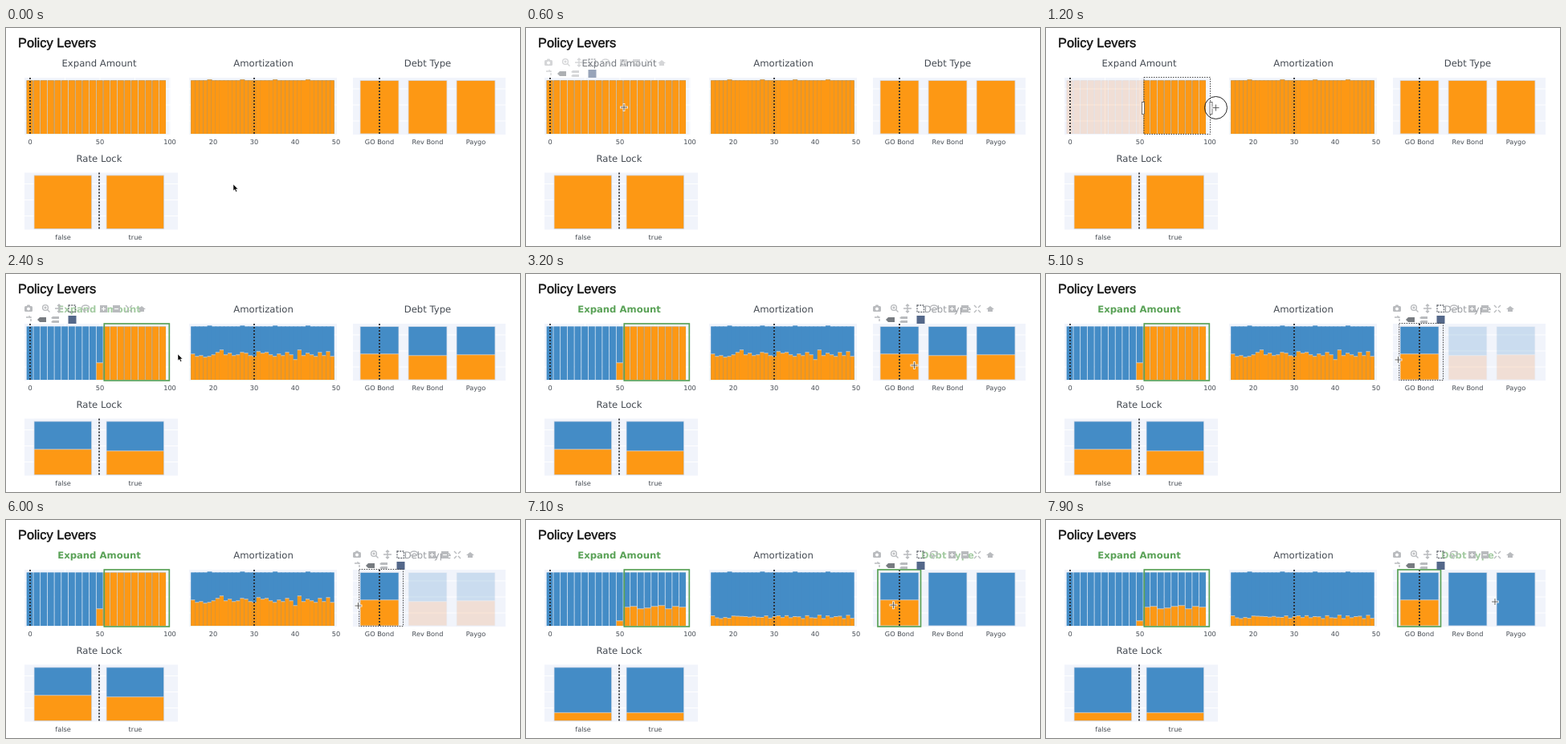
Recreate the animation shown at these times as an HTML page. Size 640x272 px, loop 8 s.

```html
<!DOCTYPE html>
<html lang="en">
<head>
<meta charset="utf-8">
<title>Policy Levers</title>
<style>
html, body { margin: 0; width: 100%; height: 100%; overflow: hidden; background: #fff; }
svg { display: block; width: 640px; height: 272px; }
text { font-family: "DejaVu Sans", Verdana, sans-serif; fill: #444a52; text-anchor: middle; text-rendering: geometricPrecision; }
.heading { font: 16.35px "Liberation Sans", Arial, sans-serif; fill: #111; stroke: #111; stroke-width: .45; text-anchor: start; }
.title { font-size: 11.65px; }
.title.done { font-weight: bold; fill: #5aa257; }
.tick { font-size: 8.2px; }
</style>
</head>
<body>
<svg id="stage" viewBox="0 0 640 272"></svg>
<script>
const LOOP = 8000;
const ORANGE = '#fd9814', DIM_ORANGE = '#f09352', BLUE = '#448cc6';
const GREEN = '#5aa257', ICON = '#b9bbbe';
const FIRST_UPDATE = 2000, SECOND_UPDATE = 6900;
const stage = document.getElementById('stage');

function add(parent, tag, attrs = {}, text) {
  const el = document.createElementNS('http://www.w3.org/2000/svg', tag);
  set(el, attrs);
  if (text) el.textContent = text;
  parent.appendChild(el);
  return el;
}
function set(el, attrs) {
  for (const key in attrs) el.setAttribute(key, attrs[key]);
}
const rect = (parent, x, y, width, height, attrs) =>
  add(parent, 'rect', { x, y, width, height, ...attrs });
const path = (parent, d, attrs) => add(parent, 'path', { d, fill: 'none', ...attrs });
const show = (el, on) => el.setAttribute('visibility', on ? 'visible' : 'hidden');

add(stage, 'text', { class: 'heading', x: 15, y: 24 }, 'Policy Levers');

// splits: orange top of every bar, after each of the two updates
function makeChart({ title, cx, x, y, w, ticks, marker, bars, base, lines = [], outlined }) {
  const top = y + 3.4;
  rect(stage, x, y, w, 71, { fill: '#f1f4fb' });
  for (const g of lines) path(stage, `M${g} ${y}v71`, { stroke: '#fff' });
  for (let i = 0; i < 3; i++) path(stage, `M${x} ${y + 14 + i * 20}h${w}`, { stroke: '#fff' });
  const barEls = bars.map(bar => {
    const g = add(stage, 'g');
    const barTop = top - (bar.rise || 0);
    rect(g, bar.x, barTop, bar.w, base - barTop, { fill: BLUE });
    const orange = rect(g, bar.x, barTop, bar.w, base - barTop);
    const edge = rect(g, bar.x, barTop, bar.w, .8, { fill: '#e2d3c4' });
    if (outlined) {
      rect(g, bar.x, barTop, bar.w, base - barTop, { fill: 'none', stroke: '#d9deea', 'stroke-width': .8 });
    }
    return { ...bar, g, orange, edge, barTop, mid: bar.x + bar.w / 2 };
  });
  path(stage, `M${marker} ${y}v71`, { stroke: '#25262b', 'stroke-width': 1.7, 'stroke-dasharray': '2 2' });
  for (const [tx, label] of ticks) add(stage, 'text', { class: 'tick', x: tx, y: base + 13 }, label);
  const titleEl = add(stage, 'text', { class: 'title', x: cx, y: y - 14 }, title);

  return {
    title: titleEl,
    setPhase(phase) {
      for (const b of barEls) {
        const split = phase ? b.splits[phase - 1] : b.barTop;
        set(b.orange, { y: split, height: Math.max(0, base - split) });
        b.edge.setAttribute('y', split - .6);
        show(b.edge, phase && split < base);
      }
    },
    select(range) {
      for (const b of barEls) {
        const lit = !range || (b.mid >= range[0] && b.mid <= range[1]);
        b.g.setAttribute('opacity', lit ? 1 : .22);
        b.orange.setAttribute('fill', lit ? ORANGE : DIM_ORANGE);
      }
    }
  };
}

const upperY = 62, upperBase = 132;
const expandTops = [109, 108, 111, 110, 108, 107, 111, 108, 109];
const expand = makeChart({
  title: 'Expand Amount', cx: 116, x: 23, y: upperY, w: 182, base: upperBase, marker: 30,
  ticks: [[30, '0'], [117, '50'], [204, '100']], lines: [30, 73.5, 117, 160.5, 204],
  bars: Array.from({ length: 20 }, (_, i) => ({
    x: 25.65 + i * 8.7, w: 8,
    splits: i < 10 ? [132, 132] : i === 10 ? [111, 126] : [65.4, expandTops[i - 11]]
  }))
});

const amortTops = [100, 103, 102, 104, 103, 101, 98, 95, 101, 99, 102, 101, 98, 99, 102, 103, 97,
  99, 98, 101, 103, 100, 102, 98, 101, 107, 95, 102, 99, 101, 103, 98, 102, 97, 103];
const amortStep = 5.1;
const amortization = makeChart({
  title: 'Amortization', cx: 320.5, x: 228, y: upperY, w: 184, base: upperBase, marker: 309,
  ticks: [[258, '20'], [309, '30'], [360, '40'], [411, '50']],
  bars: amortTops.map((v, i) => ({
    x: 230.2 + i * amortStep, w: i < amortTops.length - 1 ? amortStep + .8 : amortStep,
    rise: i % 8 === 4 ? 1 : 0,
    splits: [v, 121 + (v - 100) * .4 + (i * 7 % 5 - 2) * .7]
  }))
});

const debt = makeChart({
  title: 'Debt Type', cx: 525, x: 432, y: upperY, w: 190, base: upperBase, marker: 465,
  ticks: [[465, 'GO Bond'], [525, 'Rev Bond'], [585, 'Paygo']], outlined: true,
  bars: [100, 102, 101].map((v, i) => ({ x: 441 + i * 60, w: 48, splits: [v, i ? 132 : 100] }))
});

const rateLock = makeChart({
  title: 'Rate Lock', cx: 116, x: 23, y: 180.5, w: 191, base: 250.7, marker: 116,
  ticks: [[71, 'false'], [161, 'true']], outlined: true,
  bars: [219, 221].map((v, i) => ({ x: 35 + i * 90, w: 71.7, splits: [v, 240.5] }))
});
const charts = [expand, amortization, debt, rateLock];
charts.forEach(c => c.select(null));

const outline = (x, w) => rect(stage, x, 62, w, 71, { fill: 'none', stroke: GREEN, 'stroke-width': 1.7 });
const outlines = [outline(122.3, 81), outline(438, 53.5)];

function makeToolbar(dx) {
  const g = add(stage, 'g', { transform: `translate(${dx} 0)` });
  const line = { stroke: ICON, 'stroke-width': 1.4 };
  rect(g, 23, 40, 10, 7, { rx: 1.5, fill: ICON });
  rect(g, 26, 38.5, 4, 3, { rx: 1, fill: ICON });
  add(g, 'circle', { cx: 28, cy: 43.5, r: 2, fill: '#fff' });
  add(g, 'circle', { cx: 49, cy: 42, r: 3.4, fill: 'none', ...line });
  path(g, 'M51.5 44.5l3 3M47.5 42h3M49 40.5v3', line);
  path(g, 'M61 43h10M66 38v10M64 40l2-2 2 2M64 46l2 2 2-2', line);
  rect(g, 78, 39, 8.5, 8.5, { fill: 'none', stroke: '#6c7077', 'stroke-width': 1.3, 'stroke-dasharray': '2 1.2' });
  add(g, 'ellipse', { cx: 99, cy: 42, rx: 4.5, ry: 3, fill: 'none', ...line });
  path(g, 'M97 45q-1 2 2 3', line);
  for (const x of [117, 133]) {
    rect(g, x, 39, 9, 9, { fill: ICON });
    path(g, x === 117 ? 'M119 43.5h5M121.5 41v5' : 'M135 43.5h5', { stroke: '#fff', 'stroke-width': 1.2 });
  }
  path(g, 'M149 39l3 3M157 39l-3 3M149 48l3-3M157 48l-3-3', line);
  path(g, 'M164 44l5-4 5 4zM166 44h6v3h-6z', { fill: ICON });
  path(g, 'M25 54h6v6M29 52v4', { ...line, 'stroke-dasharray': '3 1' });
  path(g, 'M39 57l3-3h8v6h-8z', { fill: '#777b80' });
  path(g, 'M56 55l2-2h8v3h-8zM56 60l2-2h8v3h-8z', { fill: ICON });
  rect(g, 77.5, 52, 10, 10, { fill: '#54688a' });
  return g;
}
const toolbars = [makeToolbar(0), makeToolbar(409)];

const selection = add(stage, 'g');
const box = rect(selection, 0, 61.5, 0, 71, { fill: 'none', stroke: '#444', 'stroke-dasharray': '1.5 1.5' });
const handles = [0, 1].map(() => rect(selection, 0, 0, 3, 15, { fill: '#fff', stroke: '#555', 'stroke-width': .8 }));

const cursor = add(stage, 'g');
const press = add(cursor, 'circle', { r: 14, fill: 'none', stroke: '#222', 'stroke-width': 1 });
const cross = add(cursor, 'g');
path(cross, 'M-5 0h10M0-5v10', { stroke: '#fff', 'stroke-width': 2.8, opacity: .8 });
path(cross, 'M-4 0h8M0-4v8', { stroke: '#555', 'stroke-width': .9 });
const arrow = path(cursor, 'M0-4v8l1.9-1.6 1.4 3 1.4-.7-1.4-2.8h2.5z',
  { fill: '#000', stroke: '#fff', 'stroke-width': .5 });

const cursorKeys = [
  [0, 283, 199], [600, 122, 99], [700, 122, 99], [1100, 211.5, 99.5], [1700, 211.5, 99.5],
  [2300, 214, 104], [2600, 214, 104], [3100, 483.5, 114], [3300, 483.5, 114], [3700, 494.5, 107],
  [3850, 494.5, 107], [4150, 438.5, 107], [SECOND_UPDATE, 438.5, 107], [7700, 559, 102], [LOOP, 559, 102]
];
const ease = p => p * p * (3 - 2 * p);
const clamp = (v, lo, hi) => Math.min(hi, Math.max(lo, v));
function cursorAt(t) {
  const i = Math.max(1, cursorKeys.findIndex(k => k[0] >= t));
  const [t0, x0, y0] = cursorKeys[i - 1], [t1, x1, y1] = cursorKeys[i];
  const p = ease(clamp((t - t0) / (t1 - t0), 0, 1));
  return [x0 + (x1 - x0) * p, y0 + (y1 - y0) * p];
}

const within = (t, from, to) => t >= from && t < to;
const fade = (t, from, to) => clamp(Math.min((t - from) / 200, (to - t) / 200), 0, 1);

// The selection box trails the pointer while dragging.
function selectedRange(t) {
  if (within(t, 700, FIRST_UPDATE)) return [122, clamp(cursorAt(t - 60)[0], 122, 204.5)];
  if (within(t, 3850, SECOND_UPDATE)) return [Math.max(439.7, cursorAt(t - 240)[0]), 494.5];
  return null;
}

function render(t) {
  const phase = t < FIRST_UPDATE ? 0 : t < SECOND_UPDATE ? 1 : 2;
  charts.forEach(c => c.setPhase(phase));
  expand.title.classList.toggle('done', phase > 0);
  debt.title.classList.toggle('done', phase > 1);
  outlines.forEach((o, i) => show(o, phase > i));

  const range = selectedRange(t);
  expand.select(phase === 0 ? range : null);
  debt.select(phase === 1 ? range : null);
  show(selection, range);
  if (range) {
    set(box, { x: range[0], width: range[1] - range[0] });
    const mid = phase === 0 ? 100 : 107.5;
    handles.forEach((h, i) => set(h, { x: range[i] - (i ? .5 : 2.5), y: mid - 7.5 }));
  }
  handles.forEach(h => h.setAttribute('opacity', within(t, 4500, SECOND_UPDATE) ? 0 : 1));

  const firstBar = Math.max(fade(t, 450, 720), fade(t, 1500, 2750));
  const secondBar = Math.max(fade(t, 2900, 3850), fade(t, 4500, LOOP + 300));
  [firstBar, secondBar].forEach((v, i) => {
    toolbars[i].setAttribute('opacity', v);
    [expand, debt][i].title.setAttribute('opacity', 1 - .45 * v);
  });

  const [x, y] = cursorAt(t);
  const inPlot = y < 133 && y > 61 && (x < 205 || within(x, 228, 412) || x > 432);
  const pressed = within(t, 700, 1450) || within(t, 3850, 4450);
  set(cursor, { transform: `translate(${x.toFixed(2)} ${y.toFixed(2)})` });
  show(press, pressed);
  show(cross, inPlot || pressed);
  show(arrow, !inPlot && !pressed);
}

const start = performance.now();
function frame(now) {
  render(Math.max(0, now - start) % LOOP);
  requestAnimationFrame(frame);
}
render(0);
requestAnimationFrame(frame);
</script>
</body>
</html>
```
